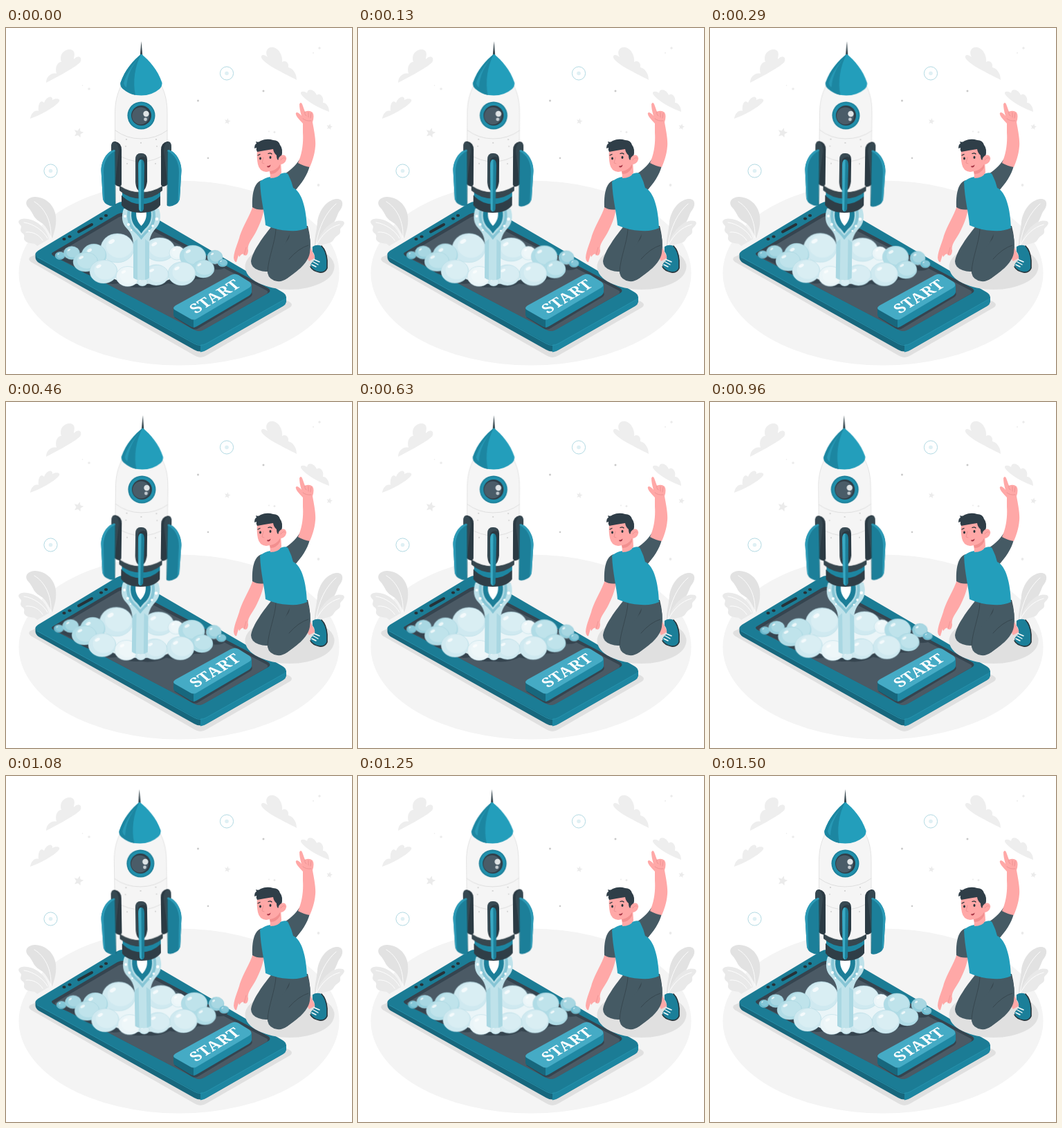
Write an HTML page that moves like this. It is 500 px wide and 500 px high and loops after 1540 ms.

```html
<!DOCTYPE html>
<html lang="en">
<head>
<meta charset="utf-8">
<title>Rocket launch</title>
<style>
html, body { margin: 0; width: 100%; height: 100%; overflow: hidden; background: #fff; }
svg { display: block; width: 100vw; height: 100vh; }
.sway { transform-origin: 195.5px 197px; animation: sway 1540ms linear infinite; }
@keyframes sway {
  0%, 97.5%, 100% { transform: rotate(0); }
  24% { transform: rotate(1deg); }
  72.5% { transform: rotate(-1deg); }
}
.line { fill: none; stroke-linecap: round; stroke-linejoin: round; }
.label { font: 600 23px "Noto Serif", serif; letter-spacing: .4px; fill: #fff; text-anchor: middle; }
</style>
</head>
<body>
<svg viewBox="0 0 500 500">
<defs>
  <path id="star" d="M0-7 2-2.2 7-2 3.2 1.6 4.2 6.4 0 4-4.4 6.4-3.2 1.6-7-2-2-2.2Z"/>
  <g id="ring">
    <circle r="9.6" fill="none" stroke="#a9d5df" stroke-width=".9"/>
    <circle r="2.8" fill="#dff0f4"/>
  </g>
</defs>

<ellipse cx="250" cy="354" rx="231.500" ry="133.500" fill="#f4f4f4"/>

<g fill="#eee">
  <path d="M58 79C58 70 66 64 73 66C70 56 75 49 80 49C76 37 86 30 93 31C102 33 98 42 98 45C104 39 110 41 108 48C107 52 86 65 58 79Z"/>
  <path d="M35 131C36 123 42 118 47 120C46 109 50 103 55 108C59 98 68 97 67 104C72 101 79 102 77 106C71 114 52 125 35 131Z"/>
  <path d="M369 43C368 38 373 38 378 42C373 33 379 26 387 28C396 31 400 42 399 49C405 46 409 51 408 57C414 58 420 65 420 75C401 65 374 53 369 43Z"/>
  <path d="M426 95C425 91 431 91 435 94C436 86 446 89 449 97C454 93 460 100 458 108C463 108 467 114 467 121C452 116 431 104 426 95Z"/>
</g>
<g fill="#ebebeb">
  <use href="#star" transform="translate(105 151) rotate(14)"/>
  <use href="#star" transform="translate(320 134.500) scale(.62) rotate(12)"/>
  <use href="#star" transform="translate(467.500 142.500) scale(.62) rotate(12)"/>
  <circle cx="120" cy="88" r="1.700"/><circle cx="110.500" cy="83" r=".8"/>
  <circle cx="453" cy="29" r="1.700"/><circle cx="444" cy="36" r=".9"/>
  <circle cx="451.500" cy="227" r="1.900"/><circle cx="388" cy="150.500" r="1.500"/><circle cx="380" cy="149.500" r=".9"/>
</g>
<g fill="#c9c9c9">
  <circle cx="277.500" cy="105" r="1.500"/><circle cx="372" cy="91" r="1.500"/><circle cx="292" cy="188" r="1.300"/>
</g>
<use href="#ring" x="319" y="65.500"/>
<use href="#ring" x="64.500" y="206.500"/>

<!-- plants -->
<g fill="#e2e2e2">
  <path d="M67 304C69 296 75 282 71 267C67 253 56 245 43 244C33 244 26 250 31 258C36 263 38 268 41 273C47 281 53 280 59 290Z"/>
  <path fill="#e9e9e9" d="M62 305C59 291 47 279 32 276C21 274 15 278 20 284C25 288 18 291 23 296C30 300 23 304 28 308C33 313 41 309 45 315Z"/>
  <path d="M446 316C445 305 449 294 450 280C452 264 463 249 477 247C488 246 488 256 483 263C478 269 478 277 472 283C464 290 457 295 453 305Z"/>
  <path fill="#e9e9e9" d="M446 318C452 300 463 283 478 279C491 277 491 283 485 288C480 292 487 295 479 300C472 304 475 309 466 311C459 313 454 313 446 318Z"/>
</g>
<g class="line" stroke="#fff" stroke-width=".9">
  <path d="M41 251C56 260 66 279 65 303M26 281C41 283 55 294 60 304M29 295C39 294 48 299 53 307"/>
  <path d="M477 254C462 267 452 287 448 313M482 284C467 288 456 299 448 315"/>
</g>

<!-- phone -->
<path fill="#e0e0e0" d="M35 331Q31 334 36 338L272 473Q281 479 290 473L410 404Q416 400 410 396L170 270Z"/>
<path fill="#17677d" d="M42.500 326V332Q43 336 47 339L272 465Q281 470 290 465L400 402Q405 399 405 394V388L281 450Z"/>
<path fill="#1d86a1" d="M281 455V468.500Q286 468 290 465L400 402Q405 399 405 394V388Z"/>
<path fill="#1b7c95" d="M46 322 159 254Q169 248 179 253L400 382Q409 388 400 393L290 455Q281 460 272 455L47 332Q39 327 46 322Z"/>
<path class="line" stroke="#2690aa" stroke-width="1" d="M45 331 272 456Q281 461 290 456L401 393"/>
<path fill="#35444f" d="M68 324 161 269Q169 265 177 269L379 376Q384 380 379 383L287 435Q279 440 271 435L68 329Q64 326 68 324Z"/>
<path fill="#4b5a65" d="M72 327 162 274Q169 270 176 274L376 379Q380 381 377 384L286 436Q279 440 272 436L72 331Q69 329 72 327Z"/>
<g fill="#263238">
  <ellipse cx="84" cy="305" rx="2.600" ry="1.900"/><ellipse cx="92" cy="301.500" rx="2.600" ry="1.900"/>
  <ellipse cx="137.500" cy="275.500" rx="2.600" ry="2"/><ellipse cx="144.500" cy="271" rx="2.600" ry="2"/>
  <path class="line" stroke="#263238" stroke-width="4" d="M105 294.500 124 284"/>
</g>

<!-- button -->
<path fill="#35444f" d="M243 418 268 434Q273 437 278 434L353 389Q358 385 354 380L330 366Z"/>
<path fill="#17677d" d="M242 404V414Q242 417 246 419L266 431Q271 434 276 431L351 387Q355 384 355 381V371Z"/>
<path fill="#1f88a3" d="M271 421V433Q274 432 276 431L351 387Q355 384 355 381V371Z"/>
<path fill="#45abc5" d="M245 401 325 357Q331 354 336 357L352 367Q357 371 352 375L276 420Q271 423 266 420L245 408Q239 405 245 401Z"/>
<text class="label" transform="matrix(.87 -.53 .72 .62 307.800 393)">START</text>

<!-- rocket -->
<g class="sway">
  <path fill="#35444f" d="M72 332Q92 340 100 345Q112 355 126 359Q140 373 163 369Q180 377 197 374.500Q215 378 234 369Q258 375 274 363Q296 364 301 349Q318 350 318 343Z"/>
  <g id="puffs"></g>

  <path fill="#bfe2ea" d="M170 261C166 273 168 283 174 289C182 297 184 305 184 314V361Q195 368 207 361V314C207 305 209 298 216 290C223 283 225 273 221 261Z"/>
  <path fill="#a9d7e2" d="M184 310 190 305V364Q186 363 184 361ZM207 310 201 305V364Q205 363 207 361Z"/>
  <path fill="#86c5d5" d="M176 262C173 277 177 288 188 297Q192 301 195.500 306Q199 301 203 297C214 288 218 277 215 262Z"/>
  <path fill="#b5dde6" d="M180 262C177 277 182 287 190 294L195.500 300 201 294C209 287 214 277 211 262Z"/>
  <path fill="#1c7e98" d="M182 262C179 276 184 285 190 290Q193 293 195.500 297Q198 293 201 290C207 285 212 276 209 262Z"/>
  <path fill="#fff" d="M188.500 264C187 274 190 280 195.500 286C201 280 204 274 202.500 264Z"/>
  <g fill="#fff">
    <circle cx="172" cy="272" r="1.900"/><circle cx="177" cy="284" r="2"/><circle cx="218" cy="276" r="2.300"/>
    <circle cx="212" cy="286" r="1.700"/><circle cx="181" cy="292" r="1.200"/><circle cx="207" cy="293" r="1.300"/>
  </g>

  <path fill="#2f3e47" d="M167 242V256Q175 267 195 267Q215 267 223 256V242Z"/>
  <path fill="#1d86a1" d="M168 235V243Q180 254.500 195 254.500Q211 254.500 223 243V235Z"/>
  <path fill="#37474f" d="M164 226V235Q177 246.500 195 246.500Q213 246.500 226 235V226Z"/>

  <path fill="#f5f5f5" stroke="#dedede" stroke-width=".8" d="M167 82C160 96 157.500 108 157.500 124V170L165 228Q178 237 195 237Q212 237 226 228L233 170V124C233 108 231 96 224 82Z"/>
  <g class="line" stroke="#d8d8d8" stroke-width=".8">
    <path d="M158 148Q174 160 195 160Q217 160 233 148M160 182Q176 193 195 193Q215 193 230 182"/>
  </g>
  <g fill="#cfcfcf">
    <circle cx="174" cy="161" r="1.100"/><circle cx="195" cy="166" r="1.100"/><circle cx="217" cy="161" r="1.100"/>
    <circle cx="175" cy="196" r="1"/><circle cx="216" cy="196" r="1"/><circle cx="173" cy="171" r=".9"/><circle cx="218" cy="171" r=".9"/>
  </g>

  <path fill="#37474f" d="M195.500 19 197.300 40H193.700Z"/>
  <path fill="#239ebb" d="M195.500 37.500C207 47 219 60 225.500 79Q226 84 222 88Q211 97.500 195.500 97.500Q180 97.500 169 88Q164.500 84 165.500 79C172 60 184 47 195.500 37.500Z"/>
  <path fill="#1c86a1" d="M195.500 37.500C184 47 172 60 165.500 79Q164.500 84 169 88Q177 95 187 97C183 78 186 55 195.500 37.500Z"/>
  <path fill="#2798b4" d="M192 43C182 54 174 66 170 80Q171 84 174 86C175 70 181 56 192 43Z"/>

  <circle cx="195.500" cy="126.500" r="20" fill="#1b7f99"/>
  <circle cx="195.500" cy="126.500" r="18.300" fill="#2190ac"/>
  <circle cx="195.500" cy="126.500" r="14.500" fill="#2f3e48"/>
  <circle cx="194.500" cy="127" r="12.500" fill="#4a5c68"/>
  <circle cx="202.500" cy="124" r="4.200" fill="#dfe4e6"/>
  <circle cx="201.500" cy="132" r="2.400" fill="#c3cbd0"/>

  <g id="side">
    <path fill="#2b3a43" d="M152 172Q152 163 158 164Q167 166 167 176V226Q166 231 160 228L152 222Z"/>
    <path fill="#455a64" d="M152 172Q152 164 157 165Q163 167 163 178L158 222 152 222Z" opacity=".45"/>
    <path fill="#1c7f99" d="M157 176C146 178 137.500 192 137.500 206L140 247Q141 252 146 255Q153 259 158 257Z"/>
    <path fill="#2b9ab6" d="M157 176C146 178 137.500 192 137.500 206L140 247 142.500 252 141 208C141 194 147 182 158 178Z"/>
    <path class="line" stroke="#156275" stroke-width=".8" d="M158 178V256"/>
  </g>
  <use href="#side" transform="matrix(-1 0 0 1 391 0)"/>
  <path fill="#2b3a43" d="M187 190Q187 181 195 181Q204 181 204 190V222Q202 236 195 236Q188 236 187 222Z"/>
  <path fill="#455a64" opacity=".5" d="M187 190Q187 181 195 181Q201 181 202 187Q192 184 190 194V228Q187 225 187 218Z"/>
  <path fill="#1c7f99" d="M191 199Q191 190 195.500 190Q200 190 200 199L199 262Q195.500 269 192 262Z"/>
  <path fill="#3aa9c3" d="M191 199Q191 190 195.500 190L195 265.500Q193 265 192 262Z"/>
</g>

<!-- kneeling figure -->
<ellipse cx="410" cy="345" rx="64.500" ry="33" fill="#e0e0e0"/>
<path fill="#ffa8a7" d="M357 257C352 272 343 285 338 300C336 309 330 320 329 332Q330 339 333 338L336 328 337 331Q342 324 344 328Q349 331 350 322C348 313 355 306 360 297C367 284 371 273 373 261Z"/>
<path class="line" stroke="#e98d8e" stroke-width=".7" d="M344 328 347 317"/>
<path fill="#1b7f99" d="M425 324Q431 318 438 319L434 328Z"/>
<path fill="#ffa8a7" d="M431 325 440 318 447 332 438 337Z"/>
<path fill="#1b7f99" d="M443 316Q449 312 456 315Q463 322 464 335V347Q461 354 453 353Q442 351 440 344Q440 340 446 335Q447 328 443 323Z"/>
<path class="line" stroke="#263238" stroke-width="1.600" d="M456 315Q463 322 464 336V347Q461 354 453 353Q443 351 440 345"/>
<path class="line" stroke="#fff" stroke-width="1.400" d="M446 335 453 338M444 338 451 342M442 342 448 345"/>
<path fill="#455a64" d="M386 284C373 300 356 322 354 337Q354 346 365 350Q376 354 386 350L422 294Z"/>
<path fill="#37474f" d="M415 287 436 286Q441 306 439 320Q437 332 424 346 412 359 402 364L390 340Z"/>
<path fill="#455a64" d="M394 287C407 291 413 297 408 305C398 318 379 337 378 354Q380 364 392 366Q399 367 406 362C417 354 436 342 439 325Q442 307 435 287Z"/>
<path class="line" stroke="#37474f" stroke-width="1" d="M390 291C389 310 379 332 378 352M437 314Q423 318 409 334"/>
<path fill="#455a64" d="M404 210C413 204 421 196 426 187Q434 189 439 199C436 212 427 225 416 237Z"/>
<path fill="#455a64" d="M370 220C359 222 355 239 356 259Q364 264 374 262L380 232Z"/>
<path fill="#239ebb" d="M367 222Q374 216 383 215L399 210Q406 208 408 212Q413 222 415 231C428 237 434 262 435 289Q425 294 409 293Q390 292 375 285C374 268 368 248 367 222Z"/>
<path fill="#ffa8a7" d="M422 195C428 182 430 166 429 151L429 138Q425 134 421 129Q417 123 420 122Q423 122 427 127Q424 117 424 110Q426 106 428 110L432 121Q438 118 443 122Q446 127 443 136C445 148 448 161 447 171C446 184 442 194 439 201Q431 200 422 195Z"/>
<path class="line" stroke="#e98d8e" stroke-width=".8" d="M432 121Q431 125 434 127M437 122V129M441 123 440 130M429 131Q434 135 441 134"/>
<path fill="#ffa8a7" d="M381 201 397 190 398 209Q394 217 382 217Z"/>
<path fill="#f28f8f" d="M381 207Q391 206 396 197L396 202Q391 211 382 211Z"/>
<path fill="#ffa8a7" d="M363 176Q362 188 364 197Q366 207 376 208Q388 207 394 199L396 176 380 170Z"/>
<path fill="#2f3e48" d="M363 179Q361 176 362 173L359 174Q359 168 362 167L361 164Q365 166 368 163Q377 159 386 162Q394 162 396 169Q401 175 398 186L393 191Q391 189 391 184Q387 181 386 175Q373 177 363 179Z"/>
<path fill="#ffa8a7" d="M394 188Q399 181 404 185Q407 190 402 195Q397 199 393 195Z"/>
<path class="line" stroke="#e98d8e" stroke-width=".8" d="M397 191Q400 186 403 188M372 187 370 195 373 196"/>
<g fill="#263238">
  <ellipse cx="367.500" cy="188.500" rx="1.400" ry="1.900"/><ellipse cx="382" cy="187" rx="1.500" ry="1.900"/>
</g>
<path class="line" stroke="#263238" stroke-width="1.300" d="M364 184 367 182.500M379 181.500Q382 180 384 182"/>
<path fill="#a53545" d="M377 199.500Q380 200 382.500 197.500Q382 201.500 379 201.500Q377 201.500 377 199.500Z"/>
</svg>
<script>
const white = "#eaf5f8", light = "#cfe9f0", mid = "#b0dce6", deep = "#93cddb", dark = "#66b8cd";
// x, y, rx, ry, colour
const puffs = [
  [222, 320, 22, 17, light], [247, 325, 11, 10, white], [161, 318, 24, 21, light],
  [302, 331, 11, 10, deep], [313, 339.5, 7, 5.5, dark], [270, 330, 19, 16, mid],
  [78, 329, 7, 5.5, dark], [95, 325, 11.5, 9.5, deep], [127, 329, 18, 17, mid], [115, 338, 18, 14, mid],
  [285, 348, 16, 13, mid], [141, 352, 20, 17, light], [254, 355, 20, 17, light],
  [176, 359, 17, 14.5, white], [217, 357, 18, 15, light], [197, 367, 7.5, 6, light]
];
const oval = (x, y, rx, ry, rest) => `<ellipse cx="${x}" cy="${y}" rx="${rx}" ry="${ry}" ${rest}/>`;
const puff = ([x, y, rx, ry, fill]) =>
  oval(x, y, rx, ry, `fill="${fill}" stroke="#a9d3de" stroke-width=".4"`) +
  oval(x + rx * .12, y - ry * .12, rx * .8, ry * .8, `fill="#fff" opacity=".2"`) +
  oval(x - rx * .35, y - ry * .45, rx * .2, ry * .13, `fill="#fff" opacity=".7" transform="rotate(-30 ${x - rx * .35} ${y - ry * .45})"`);
document.getElementById("puffs").innerHTML =
  oval(197, 341, 62, 29, `fill="${white}"`) + puffs.map(puff).join("");
</script>
</body>
</html>
```
